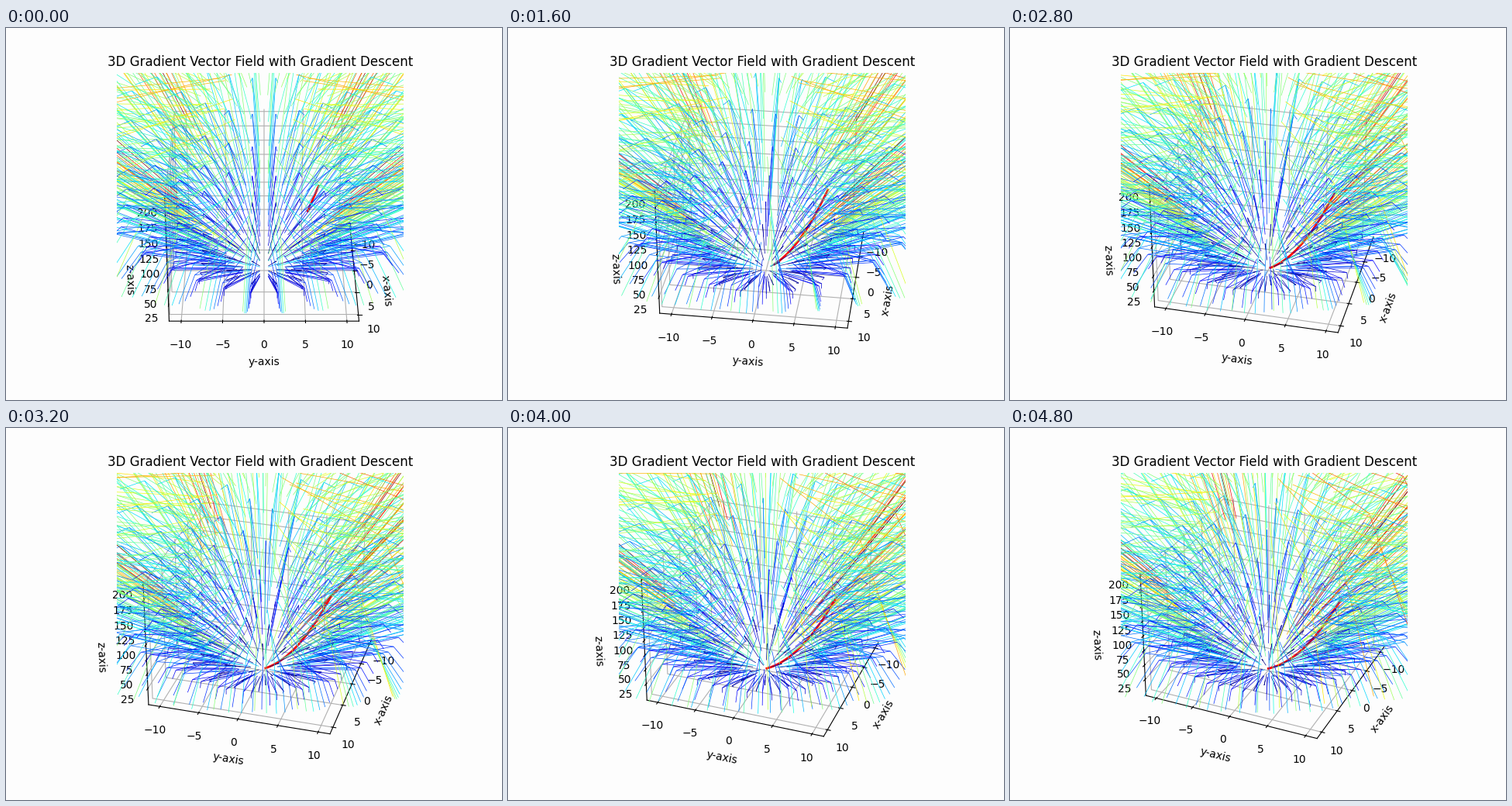
Recreate the animation shown at these times as a matplotlib script. Size 640 by 480 pixels, loop 5 s.

```python
import numpy as np
import matplotlib.pyplot as plt
from matplotlib.animation import FuncAnimation

FRAMES = 25
INTERVAL = 200
BACKGROUND = "#fdfdfd"
START = (-7.0, 7.0)
LEARNING_RATE = 0.1


def bowl(x, y):
    return x**2 + y**2


def padded(low, high):
    pad = (high - low) / 48
    return low - pad, high + pad


def descent_path(steps):
    points = [np.array(START)]
    for _ in range(steps):
        points.append(points[-1] - LEARNING_RATE * 2 * points[-1])
    x, y = np.transpose(points)
    return x, y, bowl(x, y)


fig = plt.figure(figsize=(6.4, 4.8), dpi=100, facecolor=BACKGROUND)
ax = fig.add_subplot(projection="3d", facecolor=BACKGROUND)

# Gradient field on the bowl, coloured by magnitude
side = np.linspace(-10, 10, 20)
x, y = (grid.ravel() for grid in np.meshgrid(side, side))
z = bowl(x, y)
u, v, w = 2 * x, 2 * y, 2 * z
magnitude = np.sqrt(u**2 + v**2 + w**2)
colors = plt.cm.jet(plt.Normalize()(magnitude))
ax.quiver(x, y, z, u, v, w, colors=colors, linewidth=0.5,
          arrow_length_ratio=0.3)

path = descent_path(FRAMES)
trail, = ax.plot([], [], [], color="red", linewidth=2)

ax.set_xlim(*padded(-11, 11))
ax.set_ylim(*padded(-11, 11))
ax.set_zlim(*padded(z.min(), z.max()))
ax.set_xticks(range(-10, 11, 5))
ax.set_yticks(range(-10, 11, 5))
ax.set_zticks(range(25, 201, 25))
for axis in (ax.xaxis, ax.yaxis, ax.zaxis):
    axis.set_pane_color((1, 1, 1, 0))

ax.set_xlabel("x-axis")
ax.set_ylabel("y-axis")
ax.set_zlabel("z-axis")
ax.set_title("3D Gradient Vector Field with Gradient Descent")


def update(frame):
    trail.set_data_3d(*(coord[:frame + 2] for coord in path))
    # A tiny turn at the start keeps the side wall on the left
    ax.view_init(elev=30, azim=max(frame, 0.001))
    return (trail,)


anim = FuncAnimation(fig, update, frames=FRAMES, interval=INTERVAL,
                     init_func=lambda: update(0), repeat=True)
plt.show()
```
